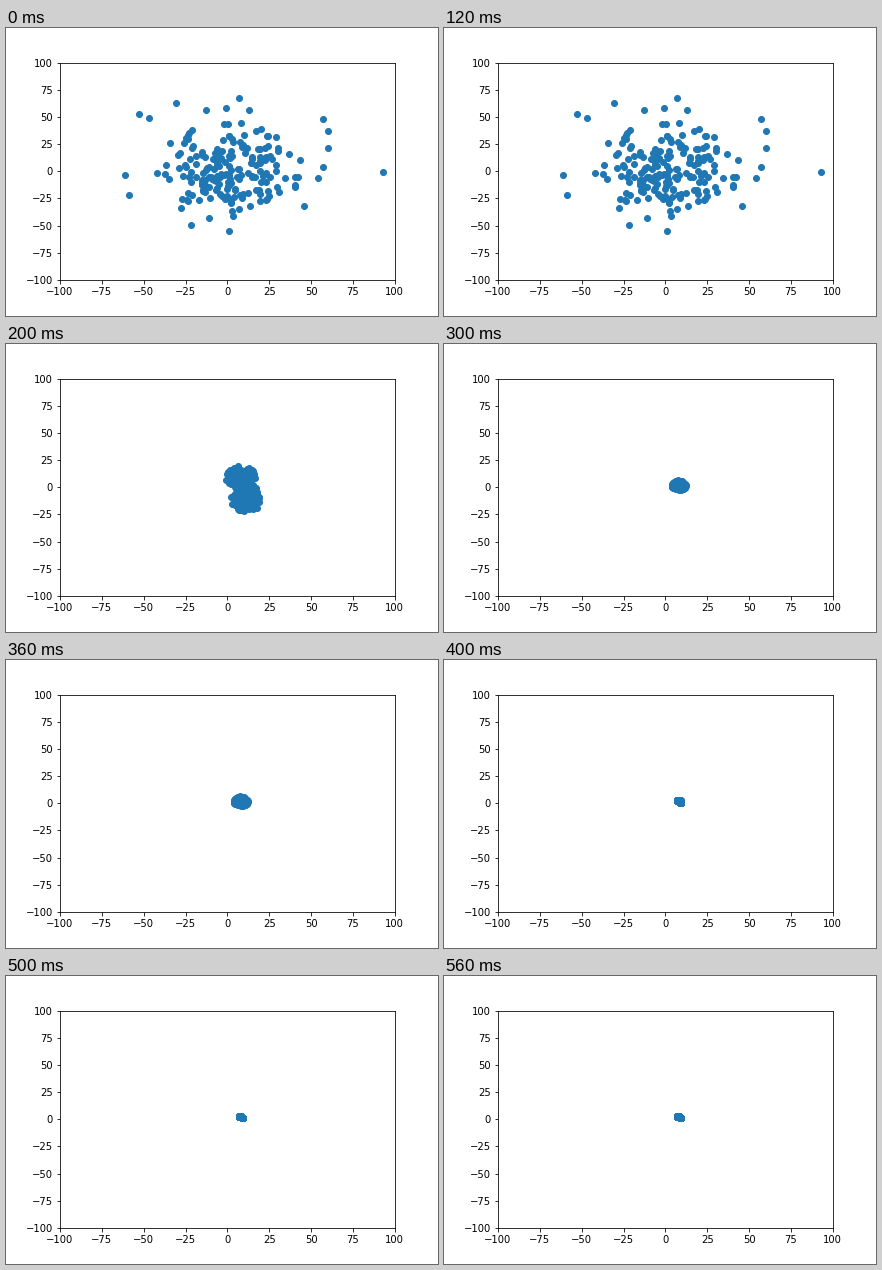
Write a matplotlib script that moves like this. It is 432 px wide and 288 px high and loops after 0.6 s.

```python
import numpy as np
import matplotlib.pyplot as plt
from matplotlib.animation import FuncAnimation

LIMIT = 100
COUNT = 200
rng = np.random.default_rng(5)

# Stragglers that give the scatter its ragged outline
STRAGGLERS = [
    (-53, 53), (-47, 49), (-31, 63), (-13, 56), (-1, 58), (7, 67),
    (13, 56), (57, 48), (60, 37), (60, 21), (57, 4), (93, -1),
    (54, -6), (46, -32), (1, -55), (-22, -49), (-59, -22), (-61, -3),
]


def scatter_cloud(count):
    """Normal cloud cut off at an ellipse, with the stragglers around it."""
    cloud = rng.normal((2, 3), (24, 22), (4 * count, 2))
    inside = np.hypot(cloud[:, 0] / 46, cloud[:, 1] / 45) < 1
    return np.vstack((STRAGGLERS, cloud[inside][:count - len(STRAGGLERS)]))


def blob(*lobes):
    """Points spread evenly over ellipses given as (x, y, rx, ry)."""
    parts = []
    for x, y, rx, ry in lobes:
        n = COUNT // len(lobes)
        angle = rng.uniform(0, 2 * np.pi, n)
        radius = np.sqrt(rng.random(n))
        parts.append(np.column_stack((x + rx * radius * np.cos(angle),
                                      y + ry * radius * np.sin(angle))))
    return np.vstack(parts)


scattered = scatter_cloud(COUNT)
states = [
    scattered,
    scattered,
    blob((8, 9.5, 9, 10), (11, -10, 9, 14)),
    blob((8, 2, 4.3, 4.3)),
    blob((7.9, 2.5, 1.2, 1), (9.1, 0.4, 0.3, 0.3)),
    blob((7.5, 2.4, 0.6, 0.6), (9.1, 1.2, 0.4, 0.4)),
]

fig, ax = plt.subplots(figsize=(6, 4), dpi=72)
fig.subplots_adjust(left=0.125, right=0.9, bottom=0.125, top=0.88)
ticks = np.arange(-LIMIT, LIMIT + 1, 25)
ax.set(xlim=(-LIMIT, LIMIT), ylim=(-LIMIT, LIMIT), xticks=ticks, yticks=ticks)
dots = ax.scatter(*scattered.T, color="#1f77b4")


def update(frame):
    dots.set_offsets(states[frame])
    return (dots,)


anim = FuncAnimation(fig, update, frames=len(states), interval=100, repeat=True)
plt.show()
```
